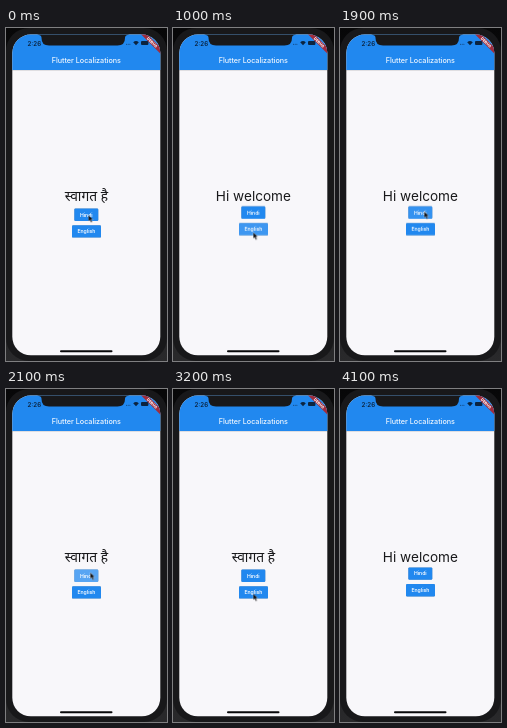
These frames come from a looping animation (161x333 px, 4.2 s). An HTML page:

```html
<!DOCTYPE html>
<html lang="en">
<head>
<meta charset="utf-8">
<title>Flutter Localizations</title>
<style>
html, body { margin: 0; width: 100%; height: 100%; overflow: hidden; background: #18181a; }
svg { display: block; width: 161px; height: 333px; }
text { font-family: Inter, Roboto, sans-serif; text-anchor: middle; }
.label { font-size: 5.1px; font-weight: 600; fill: #f4f9ff; }
.btn { fill: #2188ef; filter: drop-shadow(0 .6px .6px rgba(0, 0, 0, .3)); }
.ink { fill: #fff; opacity: 0; }
.bezel { fill: #18181a; }

.hindi, .english, .buttons, .ink { animation: 4200ms linear infinite; }
.hindi { animation-name: hindi; animation-timing-function: step-end; }
.english { animation-name: english; animation-timing-function: step-end; }
.buttons { animation-name: shift; animation-timing-function: step-end; }
.ink.hi { animation-name: press-hindi; }
.ink.en { animation-name: press-english; }
.cursor { animation: move 4200ms ease-in-out infinite, leave 4200ms step-end infinite; }

/* language switches at 800, 2000 and 3400 ms */
@keyframes hindi {
  0%, 47.619% { opacity: 1; }
  19.048%, 80.952%, 100% { opacity: 0; }
}
@keyframes english {
  0%, 47.619% { opacity: 0; }
  19.048%, 80.952%, 100% { opacity: 1; }
}
@keyframes shift {
  0%, 47.619% { transform: none; }
  19.048%, 80.952%, 100% { transform: translateY(-2.2px); }
}
@keyframes press-hindi {
  0%, 44% { opacity: 0; }
  47.619%, 50.5% { opacity: .25; }
  58%, 100% { opacity: 0; }
}
@keyframes press-english {
  0%, 15.5% { opacity: 0; }
  19.048%, 21.5% { opacity: .2; }
  28.6%, 77.5% { opacity: 0; }
  80.952%, 84% { opacity: .23; }
  91%, 100% { opacity: 0; }
}
@keyframes move {
  0%, 3% { transform: translate(82.5px, 187px); }
  12%, 30% { transform: translate(80.3px, 204.3px); }
  35.714% { transform: translate(83px, 189px); }
  39%, 52% { transform: translate(84.3px, 183.5px); }
  60%, 100% { transform: translate(80.3px, 204.6px); }
}
@keyframes leave {
  0% { visibility: visible; }
  94%, 100% { visibility: hidden; }
}
</style>
</head>
<body>
<svg viewBox="0 0 161 333">
  <defs>
    <linearGradient id="desk" x2="0" y2="1">
      <stop stop-color="#070708"/>
      <stop offset="1" stop-color="#29292b"/>
    </linearGradient>
    <clipPath id="screen"><rect x="6.3" y="6.5" width="148" height="320.8" rx="18.5"/></clipPath>
  </defs>

  <rect width="161" height="333" fill="url(#desk)"/>
  <rect class="bezel" width="161" height="333" rx="23"/>

  <g clip-path="url(#screen)">
    <rect width="161" height="333" fill="#f8f7fa"/>
    <rect width="161" height="42" fill="#2188ef"/>
    <rect y="42" width="161" height="1" opacity=".1"/>
    <text x="80.3" y="35.4" font-size="7.2" font-weight="550" fill="#f2f8ff">Flutter Localizations</text>

    <g fill="#0b2440">
      <text x="28.3" y="17.8" font-size="6.2" font-weight="600">2:26</text>
      <g opacity=".75">
        <circle cx="120.5" cy="16.2" r=".5"/>
        <circle cx="122.2" cy="16.2" r=".5"/>
        <circle cx="123.9" cy="16.2" r=".5"/>
      </g>
      <path d="M127.2 14.2Q130 11.8 132.8 14.2L130 17.3Z"/>
      <rect x="135" y="12.9" width="7.4" height="4" rx="1"/>
    </g>

    <g transform="translate(146.2 14.4) rotate(45)">
      <rect x="-15" y="-2.2" width="30" height="4.4" fill="#a12c3c"/>
      <text y="1.4" font-size="3.8" font-weight="800" fill="#fff">DEBUG</text>
    </g>
  </g>

  <path class="bezel" d="M31 6.4Q35.5 7 35.5 9.5V10Q35.5 17.6 43 17.6H111.5Q119 17.6 119 10V9.5Q119 7 123.5 6.4Z"/>
  <rect x="54" y="322.2" width="52.5" height="2" rx="1" fill="#08080a"/>

  <g fill="#19191b">
    <text class="hindi" x="80.4" y="173.4" font-size="13.8" font-weight="300" lang="hi" style="font-family: 'Noto Sans Devanagari', 'Noto Sans', sans-serif">स्वागत है</text>
    <text class="english" x="80.4" y="173" font-size="13.6">Hi welcome</text>
  </g>

  <g class="buttons">
    <rect class="btn" x="68.3" y="180.6" width="24" height="12.4" rx="1.2"/>
    <text class="label" x="80.3" y="188.6">Hindi</text>
    <rect class="ink hi" x="68.3" y="180.6" width="24" height="12.4" rx="1.2"/>
    <rect class="btn" x="66" y="197.2" width="29" height="12.4" rx="1.2"/>
    <text class="label" x="80.4" y="205.2">English</text>
    <rect class="ink en" x="66" y="197.2" width="29" height="12.4" rx="1.2"/>
  </g>

  <path class="cursor" d="M0 0V6.3L1.5 5L2.5 7.4L3.7 6.9L2.6 4.6H4.5Z" fill="#08080a" stroke="#fff" stroke-opacity=".75" stroke-width=".4"/>
</svg>
</body>
</html>
```
